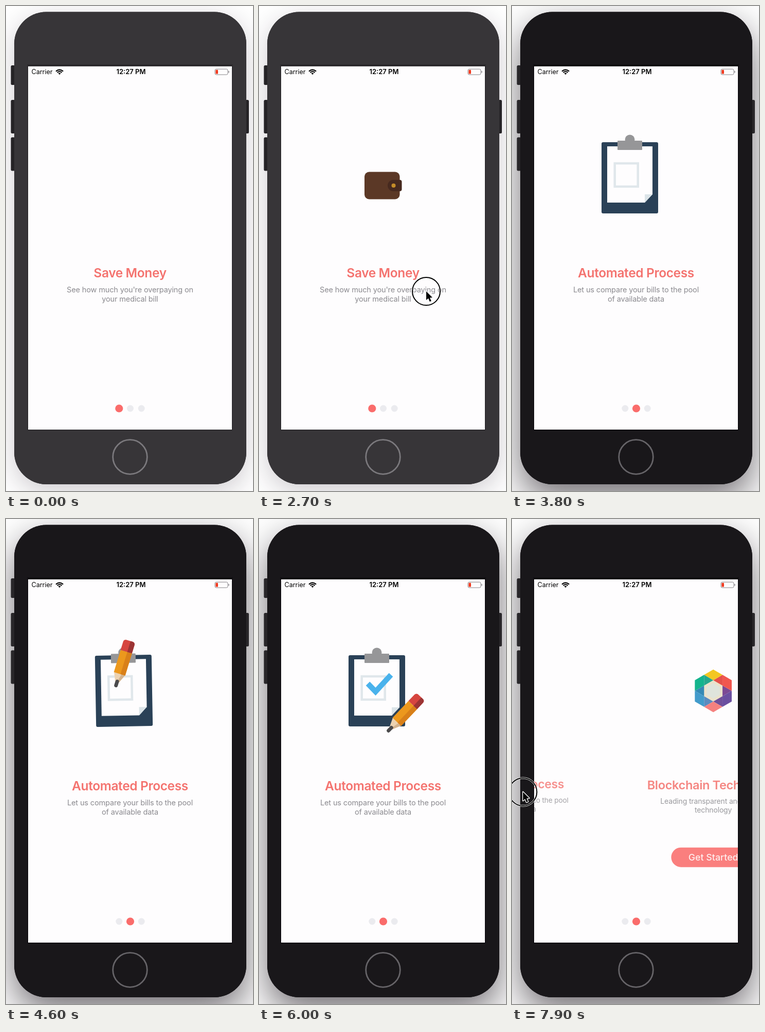
An HTML page with a canvas for the animation above (8 s loop, 480 by 940 pixels).

```html
<!DOCTYPE html>
<html lang="en">
<head>
<meta charset="utf-8">
<title>Onboarding</title>
<style>
  html, body { margin: 0; width: 100%; height: 100%; overflow: hidden; background: #fff; }
  canvas { display: block; width: 480px; height: 940px; }
</style>
</head>
<body>
<canvas id="stage"></canvas>
<script>
const LOOP = 8000, STEP = 100;
const PAGE_W = 396, MID_X = 241, MID_Y = 475;
const FOCUS_AT = 2800, SWIPE_MS = 640, SWIPE_1 = 2795, SWIPE_2 = 7528;
const CLIP_START = 3170, CLIP_LOOP = 4100;
const FONT = 'Inter, "Open Sans", sans-serif';
const CORAL = '#fa6c6b', TITLE = '#f4736f', NAVY = '#2a4157', PAPER = '#fefdfe';

const canvas = document.getElementById('stage');
const ctx = canvas.getContext('2d');
const dpr = window.devicePixelRatio || 1;
canvas.width = 480 * dpr;
canvas.height = 940 * dpr;

// Progress from 0 to 1 between two times, and easings of it
const ramp = (t, from, to) => Math.min(1, Math.max(0, (t - from) / (to - from)));
const mix = (a, b, p) => a + (b - a) * p;
const smooth = p => p * p * (3 - 2 * p);
const pop = p => p * p * (4 - 3 * p);
const bump = p => Math.sin(Math.PI * p);
const ease = (t, from, to) => smooth(ramp(t, from, to));
const mixPoint = (a, b, p) => [mix(a[0], b[0], p), mix(a[1], b[1], p)];

function box(x, y, w, h, r, fill) {
  ctx.beginPath();
  ctx.roundRect(x, y, w, h, r);
  if (fill) { ctx.fillStyle = fill; ctx.fill(); }
}

function disc(x, y, r, fill) {
  ctx.beginPath();
  ctx.arc(x, y, r, 0, Math.PI * 2);
  ctx.fillStyle = fill;
  ctx.fill();
}

function poly(points, fill) {
  ctx.beginPath();
  points.forEach(([x, y]) => ctx.lineTo(x, y));
  ctx.closePath();
  ctx.fillStyle = fill;
  ctx.fill();
}

function stroke(color, width) {
  ctx.strokeStyle = color;
  ctx.lineWidth = width;
  ctx.stroke();
}

function text(str, x, y, size, weight, color, spacing = 0, align = 'center') {
  ctx.font = `${weight} ${size}px ${FONT}`;
  ctx.letterSpacing = spacing + 'px';
  ctx.textAlign = align;
  ctx.fillStyle = color;
  ctx.fillText(str, x, y);
}

function saved(draw) {
  ctx.save();
  draw();
  ctx.restore();
}

function scaleAt(x, y, s) {
  ctx.translate(x, y);
  ctx.scale(s, s);
  ctx.translate(-x, -y);
}

function drawPhone(dark) {
  ctx.fillStyle = '#fff';
  ctx.fillRect(0, 0, 480, 940);
  const body = dark ? '#19171a' : '#373538';
  const side = dark ? '#29272a' : '#252326';
  saved(() => {
    ctx.shadowColor = dark ? 'rgba(12,6,14,.58)' : 'rgba(30,18,36,.22)';
    ctx.shadowBlur = (dark ? 70 : 52) * dpr;
    ctx.shadowOffsetY = (dark ? 28 : 14) * dpr;
    box(16, 11.5, 451, 915.5, 62, body);
  });
  box(9.5, 115, 8, 38, 2.5, side);
  box(9.5, 182, 8, 65, 2.5, side);
  box(9.5, 254.5, 8, 65, 2.5, side);
  box(464, 182, 8, 65, 2.5, side);
  box(16, 11.5, 451, 915.5, 62, body);
  box(41.5, 113, 399, 709.5, 0, dark ? '#0e0c10' : '#2b292c');
  box(43, 117, 396, 704, 0, PAPER);
  ctx.beginPath();
  ctx.arc(241, 874, 33.3, 0, Math.PI * 2);
  stroke(dark ? '#666468' : '#7b797d', 2.8);
}

function drawStatus() {
  text('Carrier', 49.5, 132.3, 12.5, 400, '#000', 0, 'left');
  text('12:27 PM', 243, 132.3, 13, 600, '#000');
  const from = -Math.PI * 0.77, to = -Math.PI * 0.23;
  for (const r of [9.2, 5.8]) {
    ctx.beginPath();
    ctx.arc(104, 132.8, r, from, to);
    stroke('#000', 2.2);
  }
  ctx.beginPath();
  ctx.moveTo(104, 133);
  ctx.arc(104, 133, 3.3, from, to);
  ctx.fillStyle = '#000';
  ctx.fill();
  box(406, 122.3, 25, 10.8, 2.6);
  stroke('#858387', 1);
  box(407.4, 123.8, 4.6, 7.8, 1.2, '#f03a20');
  box(432.2, 125.8, 1.4, 3.8, 0.7, '#858387');
}

function drawDots(active) {
  for (let i = 0; i < 3; i++) {
    const on = i === active;
    disc(219.8 + i * 21.7, 780, on ? 7.6 : 6.5, on ? CORAL : '#ebebef');
  }
}

function drawWallet(t) {
  const s = pop(ramp(t, 500, 1000)) + 0.4 * bump(ramp(t, 1100, 2200));
  const rise = 18 * bump(ramp(t, 1000, 2100));
  if (s <= 0) return;
  scaleAt(243, 348, s);
  if (rise > 0.1) {
    box(213, 322 - rise, 52, 32, 3, '#6fae5c');
    disc(239, 332 - rise, 6, '#a5d28f');
  }
  box(205, 321.5, 68.5, 53, 9, '#5b3826');
  box(250, 337, 27.5, 22, [11, 4, 4, 11], '#46291f');
  disc(261.5, 348, 4, '#c48c28');
}

function drawPencil([x, y], deg, s) {
  ctx.translate(x, y);
  ctx.rotate(deg * Math.PI / 180);
  ctx.scale(s, s);
  poly([[-3, -8], [3, -8], [11.5, -27], [-11.5, -27]], '#ecd2b0');
  poly([[0, -8], [3, -8], [11.5, -27], [4, -27]], '#d3b38f');
  box(-3.5, -14, 7, 15, 3.5, '#4b4a4c');
  box(-11.5, -71, 23, 45, 0, '#ec981d');
  box(2, -71, 9.5, 45, 0, '#d98019');
  box(-11.5, -93, 23, 22, [5, 5, 0, 0], '#d6453f');
  box(2, -93, 9.5, 22, [0, 5, 0, 0], '#9c3434');
}

function drawSquare(y, h) {
  ctx.beginPath();
  ctx.rect(199.7, y, 45, h);
  stroke('#e0e7eb', 4.5);
}

function drawBoard() {
  box(174, 264, 110, 138, 3, NAVY);
  poly([[185, 272], [273, 272], [273, 365], [258, 381], [185, 381]], PAPER);
  poly([[258, 365], [273, 365], [258, 381]], '#dbe4e8');
  drawSquare(305, 45);
}

function drawFoldingBoard() {
  box(173.5, 270, 111, 126, 2, NAVY);
  box(184, 272, 90, 108, 0, '#35b7f0');
  box(186.5, 274.5, 85.5, 122, 0, PAPER);
  drawSquare(311.5, 50);
}

const CHECK = [[211.5, 319], [226.5, 334.5], [256.5, 302]], BEND = 0.33;

function checkPoint(p) {
  const [a, b, c] = CHECK;
  return p < BEND ? mixPoint(a, b, p / BEND) : mixPoint(b, c, (p - BEND) / (1 - BEND));
}

function drawCheck(p) {
  if (p <= 0) return;
  ctx.beginPath();
  ctx.moveTo(...CHECK[0]);
  if (p > BEND) ctx.lineTo(...CHECK[1]);
  ctx.lineTo(...checkPoint(p));
  stroke('#49b2ec', 10.5);
}

function drawClipboard(t) {
  if (t < CLIP_START) return;
  const u = (t - CLIP_START) % CLIP_LOOP;
  const enter = ease(u, 1030, 1430), write = ramp(u, 1430, 1930);
  const rest = ease(u, 1930, 2430), erase = ease(u, 3230, 3630);
  const fold = ramp(u, 3700, 3800);
  const s = pop(ramp(u, 0, 500)) * (1 - ease(u, 3850, CLIP_LOOP));
  scaleAt(229, 333, s);
  saved(() => {
    ctx.translate(229, 333);
    ctx.rotate((rest - enter) * Math.PI / 180);
    ctx.translate(-229, -333);
    fold ? drawFoldingBoard() : drawBoard();
    const lift = 3.5 * fold;
    disc(229, 259 - lift, 9.5, '#969698');
    box(205 - fold, 261 - lift, 48 + fold, 18 - 2 * fold, 1, '#969698');
    drawCheck(write - erase);
  });
  if (enter > 0) {
    const [cx, cy] = checkPoint(write);
    const tip = mixPoint(mixPoint([185, 335], [cx + 1.5, cy + 6], enter), [250 - 3 * fold, 412 - 7 * fold], rest);
    const deg = mix(-12, 17, enter) + 29 * write - 2.5 * rest + 9 * fold;
    drawPencil(tip, deg, enter * (1 - 0.1 * fold));
  }
}

function drawHexagon(t) {
  const s = pop(ramp(t, 7600, 7900));
  if (s <= 0) return;
  const colors = ['#f3c722', '#f0564f', '#6b4fa0', '#f5817f', '#429bcb', '#14b48d'];
  const blends = ['#e4514b', '#7c4a94', '#70509a', '#5a8cc0', '#3489b5', '#25a88d'];
  const R = 43, edge = R * Math.cos(Math.PI / 6);
  const at = (i, r) => {
    const a = (i - 1.5) * Math.PI / 3;
    return [MID_X + r * Math.cos(a), 327.5 + r * Math.sin(a)];
  };
  scaleAt(MID_X, 327.5, s);
  poly(colors.map((c, i) => at(i, R / 2 + 0.5)), '#ebe2cb');
  colors.forEach((c, i) => {
    poly([at(i, R / 2), at(i + 0.5, edge), at(i + 1, R / 2)], blends[i]);
    poly([at(i, R), at(i + 0.5, edge), at(i, R / 2), at(i - 0.5, edge)], c);
  });
  poly(colors.map((c, i) => at(i, R * 0.36)), '#dfe4dc');
}

function drawButton() {
  box(156, 643, 170, 39.5, 19.75, CORAL);
  text('Get Started', MID_X, 669.3, 18.5, 500, '#fff');
}

const pages = [
  { title: 'Save Money', lines: ["See how much you're overpaying on", 'your medical bill'], art: drawWallet },
  { title: 'Automated Process', lines: ['Let us compare your bills to the pool', 'of available data'], art: drawClipboard },
  { title: 'Blockchain Technology', lines: ['Leading transparent and secure', 'technology'], art: drawHexagon, button: true }
];

const swipe = (t, start) => PAGE_W * ease(t, start, start + SWIPE_MS);

function drawPage(page, dx, t) {
  const k = Math.abs(dx) / PAGE_W;
  if (k >= 1) return;
  ctx.translate(dx, 0);
  scaleAt(MID_X, MID_Y, 1 - 0.1 * k);
  saved(() => page.art(t));
  ctx.globalAlpha = 1 - 0.35 * k;
  text(page.title, MID_X, 525.6, 24.5, 600, TITLE, -0.38);
  page.lines.forEach((line, n) => text(line, MID_X, 554.8 + n * 17.8, 14.5, 400, '#8b8a8f', -0.14));
  if (page.button) drawButton();
}

function drawPages(t) {
  const scroll = swipe(t, SWIPE_1) + swipe(t, SWIPE_2);
  saved(() => {
    ctx.beginPath();
    ctx.rect(43, 117, 396, 704);
    ctx.clip();
    pages.forEach((page, i) => saved(() => drawPage(page, i * PAGE_W - scroll, t)));
  });
}

function drawCursor(x, y, pressed) {
  if (pressed) {
    ctx.beginPath();
    ctx.arc(x, y, 27, 0, Math.PI * 2);
    stroke('#fff', 3.4);
    stroke('#000', 2);
  }
  saved(() => {
    ctx.translate(x, y);
    ctx.lineJoin = 'round';
    poly([[0, 0], [0, 17], [4, 13.5], [6.8, 20], [9.8, 18.8], [7, 12.4], [12, 12]], '#000');
    stroke('#fff', 2.6);
    ctx.fill();
  });
}

// The pointer glides in, then drags the page along
function drawPointer(t) {
  if (t >= 2300 && t < 3300) {
    const [x, y] = mixPoint([456, 600], [325, 553], ease(t, 2250, 2600));
    const drag = swipe(t, SWIPE_1);
    drawCursor(x - drag * 1.03, y - drag * 0.035, t >= 2700 && t < 3200);
  } else if (t >= 6500) {
    const [x, y] = mixPoint([0, 614], [317, 533], ease(t, 6440, 6950));
    const drift = 40 * ease(t, 7000, 7500);
    drawCursor(x - drift - swipe(t, SWIPE_2) * 1.04, y - drift * 0.1, t >= 7500);
  }
}

function render(now) {
  const t = Math.floor((now % LOOP) / STEP) * STEP;
  ctx.setTransform(dpr, 0, 0, dpr, 0, 0);
  drawPhone(t >= FOCUS_AT);
  drawStatus();
  drawPages(t);
  drawDots(t < SWIPE_1 + SWIPE_MS ? 0 : 1);
  drawPointer(t);
}

const start = performance.now();
function tick() {
  render(performance.now() - start);
  requestAnimationFrame(tick);
}
tick();
</script>
</body>
</html>
```
